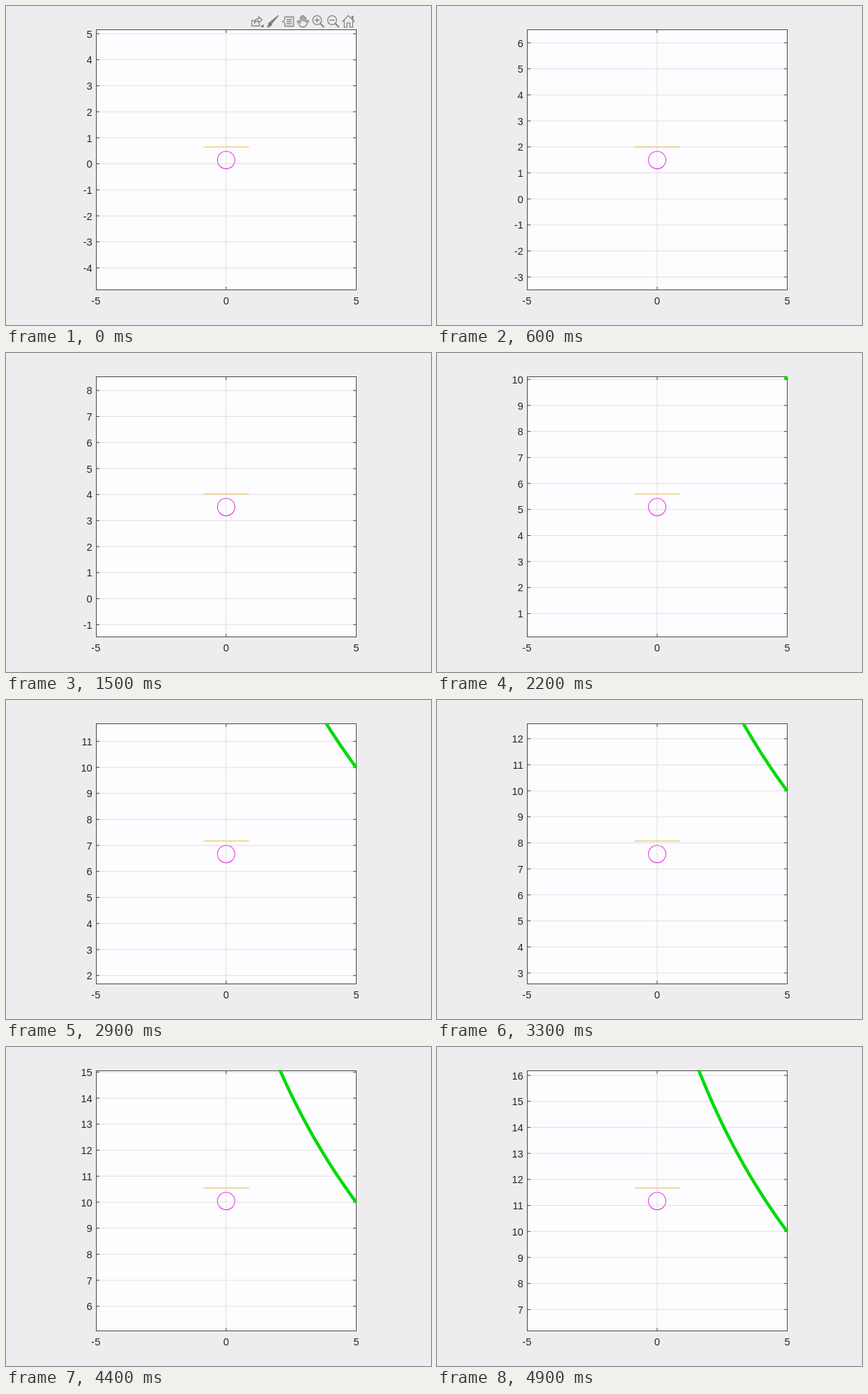
An HTML page for the animation above (5 s loop, 600 by 450 pixels).

```html
<!DOCTYPE html>
<html lang="en">
<head>
<meta charset="utf-8">
<title>Scrolling plot</title>
<style>
  html, body { margin: 0; width: 100%; height: 100%; overflow: hidden; background: #eeecef; }
  svg { display: block; width: 600px; height: 450px; }
  text { font: 14.5px "Liberation Sans", Arial, sans-serif; fill: #262626; }
  .end { text-anchor: end; }
  .mid { text-anchor: middle; }
  .grid { stroke: #e0dfe2; }
  .axis { stroke: #4a4a4c; fill: none; }
  #tools { fill: none; stroke: #858487; stroke-width: 1.3; stroke-linejoin: round; stroke-linecap: round; }
</style>
</head>
<body>
<svg viewBox="0 0 600 450">
  <defs><clipPath id="clip"><rect x="126" y="32.5" width="370.3" height="369.5"/></clipPath></defs>
  <rect width="600" height="450" fill="#eeecef"/>
  <rect x="127.5" y="33.5" width="367" height="367" fill="#fdfcff"/>
  <path class="grid" d="M310.8 34V400"/>
  <g id="rows"></g>
  <rect class="axis" x="127.5" y="33.5" width="367" height="367"/>
  <path class="axis" d="M310.8 34v4M310.8 400v-4"/>
  <text class="mid" x="126.8" y="421">-5</text>
  <text class="mid" x="310.8" y="421">0</text>
  <text class="mid" x="494.5" y="421">5</text>
  <path d="M279 198.8H343" stroke="#f0c468" stroke-width="1.3"/>
  <circle cx="310.8" cy="217.3" r="12.3" fill="none" stroke="#e63fdc" stroke-width="1.1"/>
  <path id="curve" clip-path="url(#clip)" fill="none" stroke="#00da08" stroke-width="4.5"/>
  <g id="tools">
    <path d="M350 20.5h-3v7.5h11v-3M350.500 24.500q.5-6.500 6-6.500v-3l5 4.500-5 4.500v-3q-4 0-6 3.500z"/>
    <path d="M363.500 25.800v4h-4z" fill="#555" stroke="none"/>
    <path d="M384.500 13.500L376 23.500l-2-1.700z" fill="#777"/>
    <path d="M373 22.500l2.500 2.200q-1 4.500-6.500 5 2-1.500 1.500-4 .5-2.500 2.500-3.200z" fill="#777"/>
    <path d="M393.500 15.500h12.500v13h-12.500v-4.500l-3.500-2 3.500-2zM396.500 19h6.500M396.500 22h6.500M396.500 25h6.500"/>
    <path d="M415.500 24v-7.500q1-2 2 0v4.500-6.500q1-2 2 0v6.500-6q1-2 2 0v6.500-4.500q1-1.500 2 0v6l2.200-2.500q1.800-.5 1.600 1l-3.300 5.500q-1 2.500-4 2.500h-1.500q-3 0-4.500-3l-2.700-4.500q0-1.700 1.700-1z"/>
    <path d="M445.500 20a6.300 6.300 0 1 1-12.600 0a6.300 6.300 0 1 1 12.600 0M436 20h6.500M439.200 16.800v6.500"/>
    <path d="M466.700 20a6.300 6.300 0 1 1-12.600 0a6.300 6.300 0 1 1 12.600 0M457.200 20h6.500"/>
    <path d="M444 25l4.500 4.500M465.200 25l4.500 4.500" stroke-width="2"/>
    <path d="M475 22l8.400-8.500 8.400 8.500M477.500 20v9.800h4v-6h4v6h4v-9.800M488.500 18v-3.500h1.500v5"/>
  </g>
</svg>
<script>
const LOOP = 5000, STEP = 100;
const UNIT = 36.7, MID_X = 310.8, MID_Y = 217.1;
const byId = id => document.getElementById(id);
const rows = byId("rows"), curve = byId("curve"), tools = byId("tools");

function add(parent, tag, attrs) {
  const el = document.createElementNS("http://www.w3.org/2000/svg", tag);
  for (const key in attrs) el.setAttribute(key, attrs[key]);
  return parent.appendChild(el);
}

// One row per whole number on the vertical axis
const ticks = [];
for (let value = -4; value <= 16; value++) {
  const g = add(rows, "g", {});
  add(g, "path", { class: "grid", d: "M128 0H494" });
  add(g, "path", { class: "axis", d: "M128 0h4M494 0h-4" });
  add(g, "text", { class: "end", x: 121.8, y: 5.6 }).textContent = value;
  ticks.push({ value, g });
}

// Horizontal position of the green boundary, u units above its lower end
const edgeX = u => 5 - 0.6806 * u + 0.0318 * u * (u - 1.675)
  - 0.00103 * u * (u - 1.675) * (u - 3.7);

function draw(ms) {
  const step = Math.floor((ms % LOOP) / STEP);
  const center = 0.15 + 0.225 * step;
  const screenY = y => MID_Y + (center - y) * UNIT;

  for (const { value, g } of ticks) {
    g.setAttribute("visibility", Math.abs(value - center) <= 5 ? "visible" : "hidden");
    g.setAttribute("transform", `translate(0 ${screenY(value).toFixed(2)})`);
  }

  const points = [];
  if (center + 5 >= 10) {
    for (let u = 0; u <= 6.6; u += 0.2) {
      points.push(`${(MID_X + edgeX(u) * UNIT).toFixed(2)} ${screenY(10 + u).toFixed(2)}`);
    }
  }
  curve.setAttribute("d", points.length ? "M" + points.join("L") : "");
  tools.setAttribute("visibility", step < 1 ? "visible" : "hidden");
}

const start = performance.now();
function tick() {
  draw(performance.now() - start);
  requestAnimationFrame(tick);
}
tick();
</script>
</body>
</html>
```
